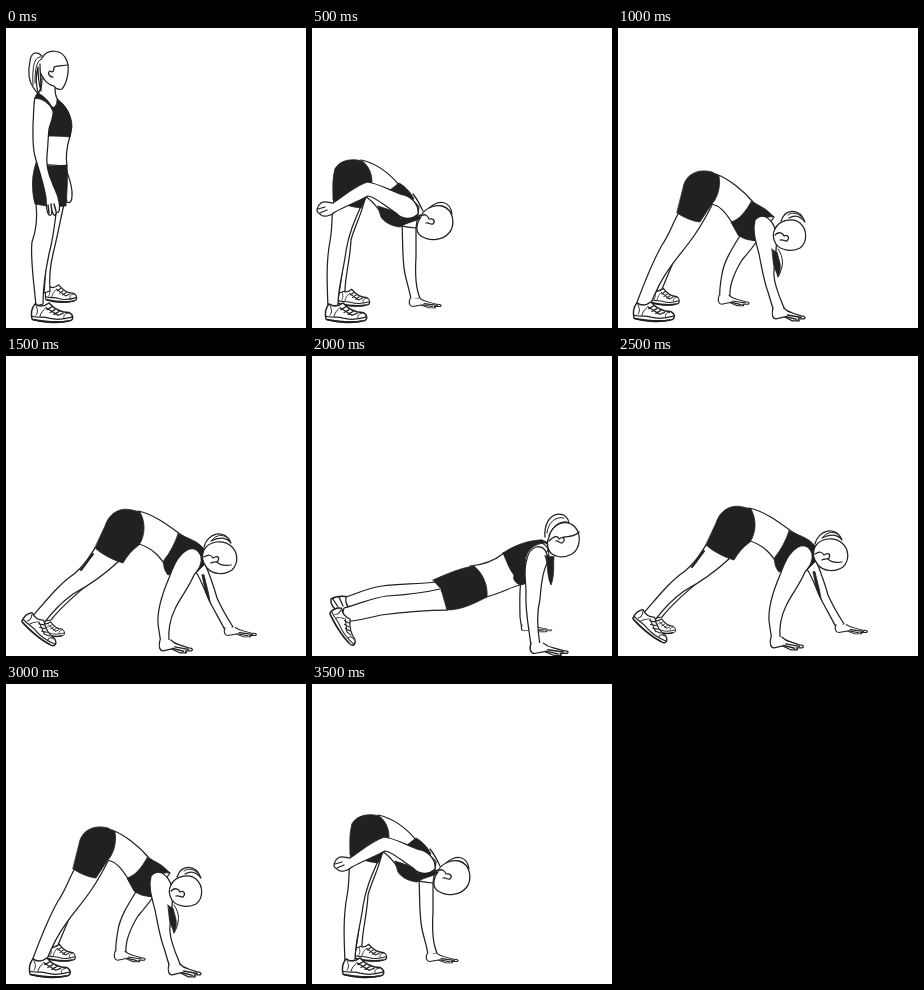
Animation of 300 by 300 pixels, one loop 4 s. Source, as an HTML page with a canvas:

```html
<!DOCTYPE html>
<html lang="en">
<head>
<meta charset="utf-8">
<title>Walkout exercise</title>
<style>
html, body { margin: 0; width: 100%; height: 100%; overflow: hidden; background: #fff; }
canvas { display: block; width: 300px; height: 300px; }
</style>
</head>
<body>
<canvas id="stage"></canvas>
<script>
const INK = '#222021';
const canvas = document.getElementById('stage');
const ctx = canvas.getContext('2d');
const ratio = window.devicePixelRatio || 1;
canvas.width = canvas.height = 300 * ratio;

function line(d, width = 1.25) {
  ctx.lineWidth = width;
  ctx.strokeStyle = INK;
  ctx.stroke(new Path2D(d));
}
function skin(d, width) {
  ctx.fillStyle = '#fff';
  ctx.fill(new Path2D(d));
  line(d, width);
}
function cloth(d) {
  ctx.fillStyle = INK;
  ctx.fill(new Path2D(d));
  line(d, 0.8);
}
function placed(x, y, sx, sy, angle, draw) {
  ctx.save();
  ctx.translate(x, y);
  ctx.rotate(angle * Math.PI / 180);
  ctx.scale(sx, sy);
  draw();
  ctx.restore();
}

// Origin: bottom of the heel, toe to the right.
function shoe(x, y, sx = 1, sy = 1, angle = 0) {
  placed(x, y, sx, sy, angle, () => {
    skin('M4,-18C0,-13 0,-7 1,-2C8,1 27,3 38,0C43,-1 43,-6 38,-9C30,-9 24,-12 18,-19C13,-15 8,-15 4,-18Z', 1.5);
    line('M1,-5C8,-3 13,-5 18,-3C25,-1 34,-2 41,-4', 1.3);
    line('M2,-1.5C10,0 27,2 37,0', 1.8);
    line('M16,-12l5,-3M19,-9l5,-3M23,-7l5,-3M27,-6l5,-2M15,-14L27,-6', 1.3);
    line('M5,-6C7,-9 7,-12 5,-16M9,-5C10,-9 12,-11 14,-13M33,-3C32,-6 34,-8 37,-8', 1);
  });
}

// Origin: outer side of the wrist, fingers to the right.
function hand(x, y, sx = 1, sy = 1, angle = 0) {
  placed(x, y, sx, sy, angle, () => {
    skin('M0,-2C-2,5 0,9 3,9L12,7L20,11L27,11L26,9L32,9C34,8 33,6 29,6L20,3C16,2 13,0 11,-2');
    line('M15,5L29,7.5M13,6.5L24,9.5', 1.5);
  });
}

function standing() {
  shoe(39, 273, 0.76, 0.85);
  skin('M38,223C41,238 39,253 38,265L44,263C43,249 44,238 47,226C51,210 54,194 58,176');
  skin('M59,138C62,148 67,157 66,168C66,173 64,176 61,174L58,160');
  skin('M30,176C32,193 30,203 26,214C24,229 28,255 30,278L37,276C37,257 40,240 43,226C46,215 49,196 51,177');
  shoe(25, 293, 1, 0.95);
  skin('M36,50C36,58 35,63 30,68L39,109C40,119 37,128 32,136L61,138C59,127 61,118 64,108C67,96 64,84 57,77C50,72 49,67 49,60');
  cloth('M32,65C38,68 43,73 46,79C50,80 51,75 51,71C60,77 66,88 66,99L64,109C56,108 48,108 40,108L37,80L29,70Z');
  cloth('M30,135C39,139 52,138 61,137C62,149 61,165 60,178C49,179 39,178 29,176C25,161 26,146 30,135Z');
  skin('M29,70C27,78 28,87 27,96C27,108 26,121 30,132C34,145 38,157 40,170C40,178 41,185 43,187C45,188 46,186 46,183C48,189 50,188 50,184C54,186 54,179 53,174C52,165 48,161 46,154C42,145 40,136 41,127C42,118 42,110 43,101C45,93 48,88 47,83C44,75 38,71 29,70');
  line('M42,177L43,185M45,176L46,184M48,176L50,183', 1.5);
  skin('M36,30C41,21 56,20 61,33C64,42 61,55 56,61C53,62 50,61 48,58C42,57 36,51 33,41C32,36 33,33 36,30Z');
  line('M62,37C57,38 52,37 48,39C48,43 47,45 44,43C41,44 43,49 47,49');
  skin('M36,28C30,22 25,25 24,33C22,43 22,52 27,59L33,67C29,56 30,46 32,39C32,48 33,56 35,63C35,53 34,45 34,36');
  line('M35,29C28,28 26,40 27,57M35,31C30,34 29,43 29,55', 1);
}

function reachingDown() {
  shoe(43, 276, 0.76, 0.83);
  skin('M50,218C48,234 47,248 44,264L50,262C50,247 55,232 56,211C60,196 67,185 70,169');
  skin('M39,170C36,186 38,197 35,212C31,233 32,255 33,278L43,276C43,258 49,239 51,222C54,204 59,193 66,177');
  shoe(30, 292, 1, 0.95);
  skin('M107,194C108,213 107,231 110,245C112,255 115,262 116,271L125,269C120,258 120,244 121,228L121,196');
  hand(115, 271, 0.94, 0.72);
  skin('M66,131C81,134 95,145 105,157L124,178L121,199C107,198 94,195 84,181C79,174 73,169 70,167');
  cloth('M40,140C44,131 57,129 67,132C75,137 80,151 75,162C70,170 69,174 66,179C56,178 47,175 38,171C38,161 37,150 40,140Z');
  cloth('M95,161L104,154C111,158 116,164 119,170L111,174Z');
  cloth('M83,177L104,184L105,190L124,187L126,189C119,193 113,193 105,198C96,197 89,193 86,188Z');
  skin('M38,174C50,166 60,157 72,153C83,154 98,163 109,166C119,169 124,178 123,185C117,191 107,191 101,184C91,178 81,168 73,167C62,173 51,177 40,183C36,187 28,189 25,185C20,183 22,177 26,174C30,171 34,174 38,174Z');
  line('M23,180L30,178M25,184L32,181');
  line('M118,165C123,171 126,178 128,182');
  line('M104,188C112,192 119,190 126,186', 1.8);
  skin('M134,179C145,170 155,172 157,185C152,180 147,177 140,180');
  line('M141,178C147,175 152,178 155,182', 1);
  skin('M127,185C132,178 143,174 151,179C159,184 160,197 154,204C148,211 135,213 126,207C120,203 121,195 126,188');
  line('M126,187C130,184 133,187 134,190C138,189 141,192 138,195C135,196 134,193 131,194');
}

function handsForward() {
  shoe(33, 276, 0.68, 0.83);
  skin('M54,231C47,241 43,250 38,264L44,261L57,230');
  skin('M60,186C54,197 51,207 44,217C35,233 28,250 18,277L31,280C37,264 44,250 53,238C65,221 77,211 94,177');
  shoe(15, 292, 0.99, 0.95);
  skin('M123,206C115,219 106,233 104,246C102,257 101,264 102,271L112,269C111,257 116,245 124,232C130,225 135,219 139,213');
  hand(101, 269, 0.91, 0.8);
  skin('M98,146C111,151 126,163 135,174L156,189L139,213C126,211 118,204 113,193C107,184 102,178 94,176');
  cloth('M65,160C67,147 79,140 94,144L101,148C103,160 99,171 93,177L82,194C74,193 67,190 59,185Z');
  cloth('M133,174C141,177 151,182 155,189C142,187 137,202 138,212C130,213 124,210 120,207L113,194C121,192 128,183 133,174Z');
  skin('M137,192C134,203 138,214 141,226C144,241 146,254 150,264L156,284L167,282C162,270 157,260 156,248C155,237 160,222 158,208C158,196 147,181 137,192');
  hand(155, 282, 0.97, 0.99);
  cloth('M154,221C157,225 159,221 160,228C162,235 164,239 160,249C158,242 155,238 155,232Z');
  line('M160,221C166,229 166,239 160,249', 1);
  skin('M163,193C167,181 181,179 187,194C183,189 178,186 171,190');
  line('M170,187C175,183 181,186 185,190', 1);
  skin('M157,201C161,192 175,189 182,195C190,202 189,215 182,220C175,224 163,223 158,216C155,211 154,206 157,201Z');
  line('M157,207C161,203 165,205 166,208C170,206 172,210 169,213C166,213 165,211 162,212');
}

function pike() {
  shoe(33, 279, 0.61, 0.72, 2);
  skin('M94,205C80,218 58,240 39,265L45,264C58,247 74,236 92,219');
  skin('M89,192C82,203 77,211 68,218C52,229 40,245 25,262L38,267C47,255 56,246 67,238C82,230 98,219 113,205');
  line('M87,198C82,204 79,210 75,214', 2);
  shoe(14, 266, 1, 0.82, 37);
  skin('M190,216C197,227 200,239 206,250C212,261 216,268 220,276L227,271C220,260 215,251 211,242C208,231 204,220 200,210');
  hand(219, 273, 0.95, 0.72);
  cloth('M196,219C198,228 199,237 204,246C203,237 200,228 198,219Z');
  skin('M132,155C147,158 162,169 174,178L198,193L190,215L167,218C158,210 153,194 133,188');
  cloth('M99,170C103,157 114,151 126,154L134,156C140,167 139,180 133,189C126,194 121,200 117,207C107,204 97,199 89,192Z');
  cloth('M172,178C181,182 192,185 197,192L199,208L189,218L167,217L162,219C158,214 157,209 158,204C164,197 169,187 172,178Z');
  skin('M181,194C171,200 167,211 163,222C157,236 151,253 152,268L155,288L163,286C162,273 164,263 169,253C174,242 182,233 188,219C192,214 197,208 195,200C192,193 187,191 181,194Z');
  hand(154, 286, 0.98, 0.98);
  skin('M198,191C201,177 219,172 225,187C220,181 213,181 205,185');
  line('M206,184C211,178 218,178 223,183', 1);
  skin('M198,194C203,185 217,183 225,190C232,196 233,207 226,214C219,219 207,219 201,212C197,207 195,200 198,194Z');
  line('M198,201C203,198 205,199 207,202C211,199 214,201 212,205C209,207 207,205 205,207M211,206C214,209 219,210 225,209');
}

function plank() {
  skin('M37,241C31,240 24,240 19,243C18,248 22,254 28,256L39,250', 1.5);
  line('M21,243L26,251M27,241L31,250');
  skin('M125,226C106,228 87,228 70,230C56,232 46,237 34,241C33,246 35,250 38,253C60,249 91,244 130,235');
  skin('M128,233C111,237 92,239 75,240C59,242 48,248 32,252L28,266C43,266 55,262 69,259C92,256 112,254 135,254');
  shoe(16, 257, 0.98, 0.77, 55);
  skin('M209,225C207,237 208,250 208,261L210,274L222,271L220,225');
  hand(210, 270, 0.9, 0.54);
  skin('M158,210C171,209 182,205 192,197L229,184L239,190L212,228C200,230 188,238 174,241');
  cloth('M121,224C135,218 148,212 162,210C172,218 176,231 175,241C163,247 150,254 135,254L129,233Z');
  cloth('M191,197C201,190 216,184 230,184L237,187C221,186 211,197 214,210L213,227L208,229C202,226 201,223 202,219C197,213 195,206 191,197Z');
  skin('M215,203C211,213 214,225 214,236C213,256 217,272 219,290L228,289C225,271 225,255 228,243C229,230 230,218 234,210C238,201 234,189 224,191C219,193 216,197 215,203');
  line('M230,187C236,190 239,197 235,204');
  hand(219, 289, 1.12, 0.94);
  cloth('M233,200C237,209 234,218 239,229C243,219 241,209 242,201Z');
  skin('M233,181C232,170 237,158 247,158C253,158 256,162 257,167C249,163 241,170 237,180');
  line('M235,177C236,167 243,160 252,162', 1);
  skin('M237,181C240,168 254,162 263,171C270,179 268,193 260,198C251,203 240,201 237,194C235,190 235,185 237,181Z');
  line('M237,185C242,180 246,179 247,183C252,179 254,184 250,187C247,187 246,184 244,185M267,176C263,180 257,181 251,181');
}

const poses = [
  [standing, 0, 0],
  [reachingDown, -17, 1],
  [handsForward, 0, 0],
  [pike, 0, 0],
  [plank, 0, 0],
  [pike, -1, -3],
  [handsForward, 8, 0],
  [reachingDown, 0, 0]
];
const HOLD = 500;
let shown = -1;

function render(now) {
  const step = Math.floor(now / HOLD) % poses.length;
  if (step !== shown) {
    shown = step;
    const [draw, dx, dy] = poses[step];
    ctx.setTransform(ratio, 0, 0, ratio, 0, 0);
    ctx.fillStyle = '#fff';
    ctx.fillRect(0, 0, 300, 300);
    ctx.translate(dx, dy);
    ctx.lineCap = ctx.lineJoin = 'round';
    draw();
  }
}
function tick() {
  render(performance.now());
  requestAnimationFrame(tick);
}
tick();
</script>
</body>
</html>
```
